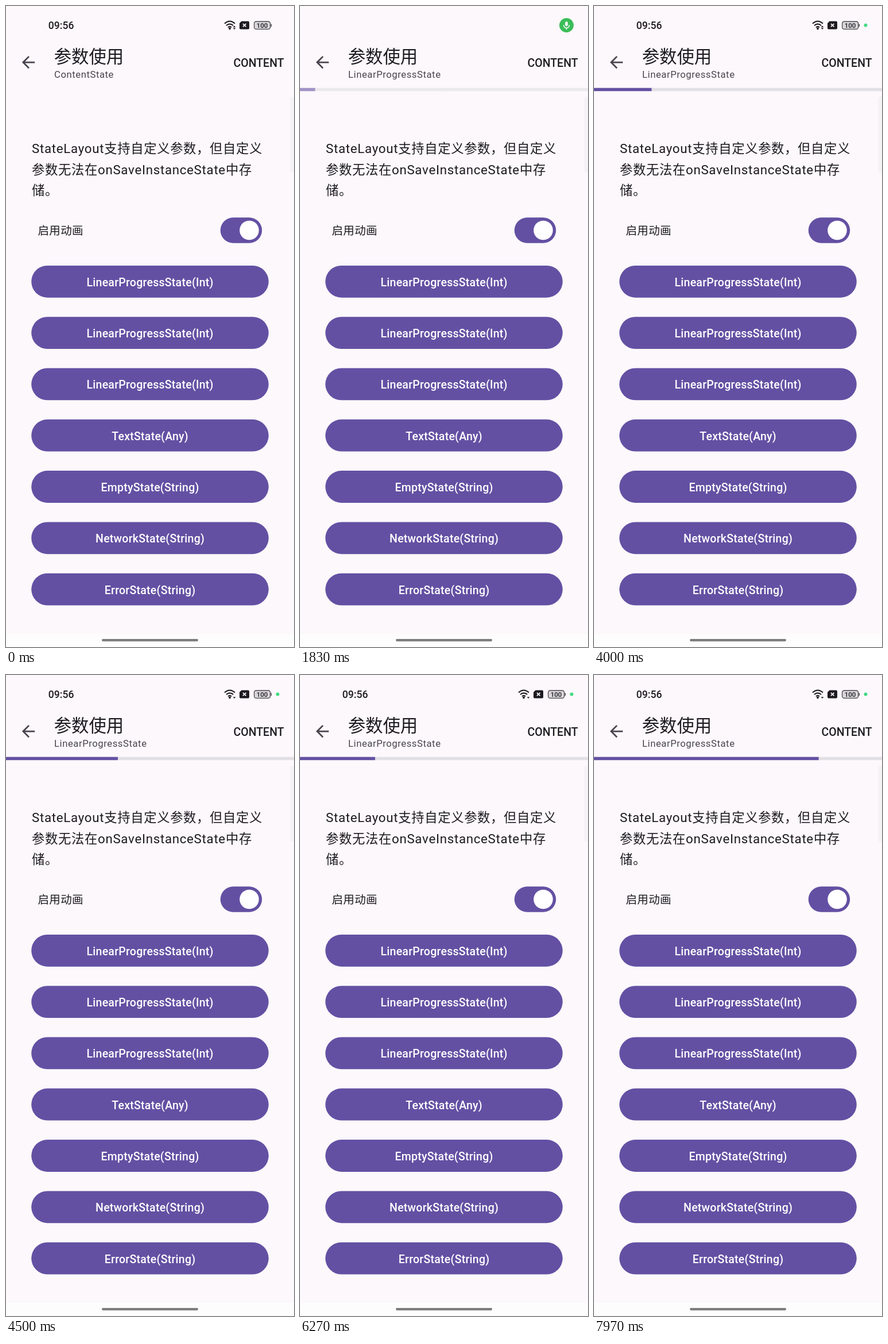
These frames come from a looping animation (502 px wide and 1116 px high, 8 s). An HTML page:

```html
<!DOCTYPE html>
<html lang="zh-CN">
<head>
<meta charset="utf-8">
<title>参数使用</title>
<style>
html, body { margin: 0; width: 100%; height: 100%; overflow: hidden; background: #fcf8fb; }
svg { display: block; width: 502px; height: 1116px; }
text { font-family: Roboto, "Noto Sans CJK SC", "Noto Sans CJK", sans-serif; fill: #1d1b20; }
.title { font-size: 30.4px; }
.sub { font-size: 16.7px; letter-spacing: .55px; fill: #49454f; }
.action { font-size: 19.5px; font-weight: 500; }
.body { font-size: 22.3px; letter-spacing: .7px; }
.label { font-size: 19.5px; letter-spacing: .35px; }
.clock { font-size: 17.6px; font-weight: 500; }
.btn { font-size: 19.5px; font-weight: 500; letter-spacing: .26px; fill: #fff; text-anchor: middle; }
.primary { fill: #6450a3; }
</style>
</head>
<body>
<svg viewBox="0 0 502 1116">
  <rect width="502" height="1116" fill="#fcf8fb"/>
  <rect y="1093" width="502" height="23" fill="#fdfdfd"/>
  <rect x="167" y="1102" width="168" height="4.2" rx="2.1" fill="#7d7c7e"/>

  <g id="status">
    <text class="clock" x="73.8" y="40">09:56</text>
    <g fill="none" stroke="#1d1b20" stroke-width="2.1">
      <path d="M381 30.5Q390 22.5 399 30.5M384 34Q390 28.7 396 34M387 37.2Q390 34.6 393 37.2"/>
    </g>
    <circle cx="390" cy="39.3" r="1.9" fill="#1d1b20"/>
    <path id="up" d="M395.7 37L398 34.2L400.3 37Z" fill="#1d1b20"/>
    <path d="M395.7 38.2L398 41L400.3 38.2Z" fill="#1d1b20"/>
    <path d="M410.5 26.5H422Q424 26.5 424 28.5V38.5Q424 40.5 422 40.5H409Q407 40.5 407 38.5V30Z" fill="#1d1b20"/>
    <path d="M413 30.8l5.4 5.4m0-5.4l-5.4 5.4" stroke="#fff" stroke-width="1.8"/>
    <rect x="432.6" y="27" width="28" height="13.4" rx="3.6" fill="#d9d7da" stroke="#4a484c" stroke-width="1.3"/>
    <path d="M462.3 31.3v4.8" stroke="#4a484c" stroke-width="1.5"/>
    <text x="446.6" y="37.8" font-size="11.5" font-weight="500" text-anchor="middle">100</text>
  </g>
  <circle id="chip" cy="33.5" fill="#3bbd59"/>
  <g id="mic" fill="none" stroke="#fff" stroke-width="1.5" stroke-linecap="round">
    <rect x="462.2" y="27" width="4.6" height="8.4" rx="2.3" fill="#fff" stroke="none"/>
    <path d="M459.7 33.5a4.8 4.8 0 0 0 9.6 0M464.5 38.4v2.2"/>
  </g>

  <path transform="translate(22.3 81.3) scale(1.394)" fill="#49454f"
    d="M20 11H7.83l5.59-5.59L12 4l-8 8 8 8 1.41-1.41L7.83 13H20z"/>
  <text class="title" x="83.7" y="98.7">参数使用</text>
  <text class="sub" id="state" x="84" y="125">ContentState</text>
  <text class="action" x="396.5" y="105.5">CONTENT</text>

  <g id="progress">
    <rect y="142.7" width="502" height="5.5" fill="#e2dfe5"/>
    <rect class="primary" id="bar" y="142.7" height="5.5"/>
  </g>
  <path d="M502 158H499Q495 158 495 162V286Q495 290 499 290H502Z" fill="#f5f3f6"/>

  <text class="body" x="45" y="256">StateLayout支持自定义参数，但自定义</text>
  <text class="body" x="45" y="292.5">参数无法在onSaveInstanceState中存</text>
  <text class="body" x="45" y="329">储。</text>

  <text class="label" x="55.5" y="398">启用动画</text>
  <rect class="primary" x="373.7" y="368.2" width="72.5" height="44.6" rx="22.3"/>
  <circle cx="424" cy="390.5" r="16.8" fill="#fff"/>
  <g id="buttons"></g>
</svg>
<script>
const LOOP = 8000, WIDTH = 502, OMEGA = Math.sqrt(50);
const $ = id => document.getElementById(id);
const clamp = x => Math.max(0, Math.min(1, x));
const ramp = (t, from, to) => {
  const p = clamp((t - from) / (to - from));
  return p * p * (3 - 2 * p);
};
const mix = (a, b, p) => a + (b - a) * p;

const labels = [...Array(3).fill("LinearProgressState(Int)"),
  "TextState(Any)", "EmptyState(String)", "NetworkState(String)", "ErrorState(String)"];
$("buttons").innerHTML = labels.map((label, i) => {
  const y = 451.9 + i * 89.3;
  return `<rect class="primary" x="44.2" y="${y}" width="413.6" height="55.8" rx="27.9"/>
    <text class="btn" x="251.1" y="${y + 35.8}">${label}</text>`;
}).join("");

// Each tap retargets the bar: [time in ms, change of progress]
const SHOW = 1690;
const taps = [[SHOW, .2], [4200, .3], [5850, -.3], [7230, .6]];

// Critically damped spring step response
const spring = ms => {
  const x = OMEGA * Math.max(0, ms) / 1000;
  return 1 - (1 + x) * Math.exp(-x);
};

function draw(t) {
  const value = taps.reduce((sum, [at, step]) => sum + step * spring(t - at), 0);
  $("bar").setAttribute("width", WIDTH * clamp(value));
  $("progress").setAttribute("opacity", ramp(t, SHOW, SHOW + 250));
  $("state").textContent = t < SHOW ? "ContentState" : "LinearProgressState";

  // Microphone chip grows in, then shrinks to a dot
  const grow = ramp(t, 400, 700), shrink = ramp(t, 1900, 2250);
  $("chip").setAttribute("cx", mix(464.5, 473.5, shrink));
  $("chip").setAttribute("r", mix(12.5 * grow, 3, shrink));
  $("chip").setAttribute("fill", shrink < 1 ? "#3bbd59" : "#45d984");
  $("mic").setAttribute("opacity", grow * (1 - ramp(t, 1900, 2050)));
  $("status").setAttribute("opacity", 1 - ramp(t, 250, 450) + ramp(t, 2100, 2350));
  $("up").setAttribute("opacity", t < 4200 ? 1 : 0);
}

function tick() {
  draw(performance.now() % LOOP);
  requestAnimationFrame(tick);
}
tick();
</script>
</body>
</html>
```
